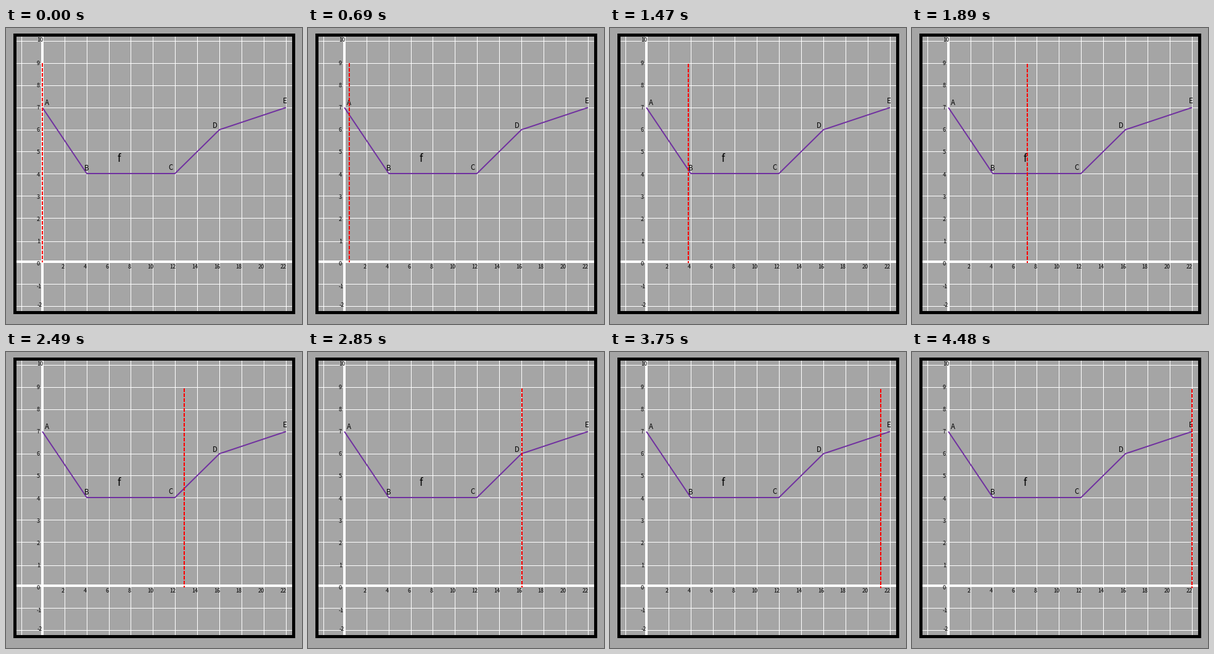
A matplotlib script that plays this animation: 480x480 px, repeating every 4680 ms.

```python
import math

import matplotlib.pyplot as plt
from matplotlib.animation import FuncAnimation
from matplotlib.patches import Rectangle

SIZE, DPI = 480, 100
INTERVAL, FRAMES = 30, 156
START, LAST_STEP, SETTLE, STEP = 330, 4290, 4470, 60
PT = 72 / DPI  # points per pixel

fig = plt.figure(figsize=(SIZE / DPI, SIZE / DPI), dpi=DPI, facecolor="#a5a5a5")
ax = fig.add_axes([0, 0, 1, 1])
ax.set_xlim(0, SIZE)
ax.set_ylim(SIZE, 0)
ax.axis("off")


def box(x0, y0, x1, y1, color):
    ax.add_patch(Rectangle((x0, y0), x1 - x0, y1 - y0, color=color,
                           lw=0, antialiased=False))


def label(x, middle, text, size):
    """Centre text on x, with its capitals centred vertically on middle."""
    ax.text(x, middle + 0.366 * size, text, fontsize=size * PT, ha="center",
            va="baseline", color="black", family="Noto Sans CJK JP", zorder=4)


# Frame and grid
box(12, 9, 469, 464, "black")
box(17, 14, 464, 459, "#a5a5a5")
for x in (25, 95, 131, 167, 202, 238, 274, 310, 346, 382, 418, 454):
    box(x, 14, x + 1, 459, "white")
for y in (21, 57, 93, 129, 165, 200, 236, 272, 308, 346, 415, 451):
    box(17, y, 464, y + 1, "white")
box(57, 14, 61, 459, "white")
box(17, 377, 464, 381, "white")

# Piecewise linear function
points = {"A": (59, 129), "B": (131, 236), "C": (274, 236),
          "D": (346, 165), "E": (454, 129)}
ax.plot(*zip(*points.values()), color="#7030a0", lw=2 * PT,
        solid_capstyle="butt", solid_joinstyle="round", zorder=3)

# Axis numbers and names
for value in range(10):
    label(52.5, 382 - 36.2 * value, str(value), 9.2)
label(55.5, 18.5, "10", 9.2)
label(54, 418.5, "-1", 9.2)
label(54.5, 448.5, "-2", 9.2)
for value in range(2, 24, 2):
    x = 56.5 + 17.9 * value - (1 if value >= 10 else 0)
    label(x, 386.5, str(value), 9.2)
offsets = {"A": (7.5, -8.5), "B": (0, -9.5), "C": (-6.5, -10.5),
           "D": (-7, -7.5), "E": (-1.5, -11)}
for name, (dx, dy) in offsets.items():
    px, py = points[name]
    label(px + dx, py + dy, name, 11.5)
label(183, 210.5, "f", 17)

scanner, = ax.plot([], [], color="#ff0000", lw=2 * PT, ls=(0, (3, 1)),
                   dash_capstyle="butt", zorder=5)


def progress(t):
    """Eased travel from 0 to 1, advancing in steps of 60 ms."""
    if t < START:
        return 0
    if t >= SETTLE:
        return 1
    t = min(START + (t - START) // STEP * STEP, LAST_STEP)
    u = (t - 20) / 4560
    return u - math.sin(2 * math.pi * u) / (2 * math.pi)


def update(i):
    p = progress(i * INTERVAL)
    x = 59 + math.floor(395 * p + 0.15)
    top = 57 + math.floor(3 * p + 0.5)
    scanner.set_data([x, x], [top, top + 323])
    return scanner,


anim = FuncAnimation(fig, update, frames=FRAMES, interval=INTERVAL,
                     repeat=True, repeat_delay=0, blit=False)
plt.show()
```
